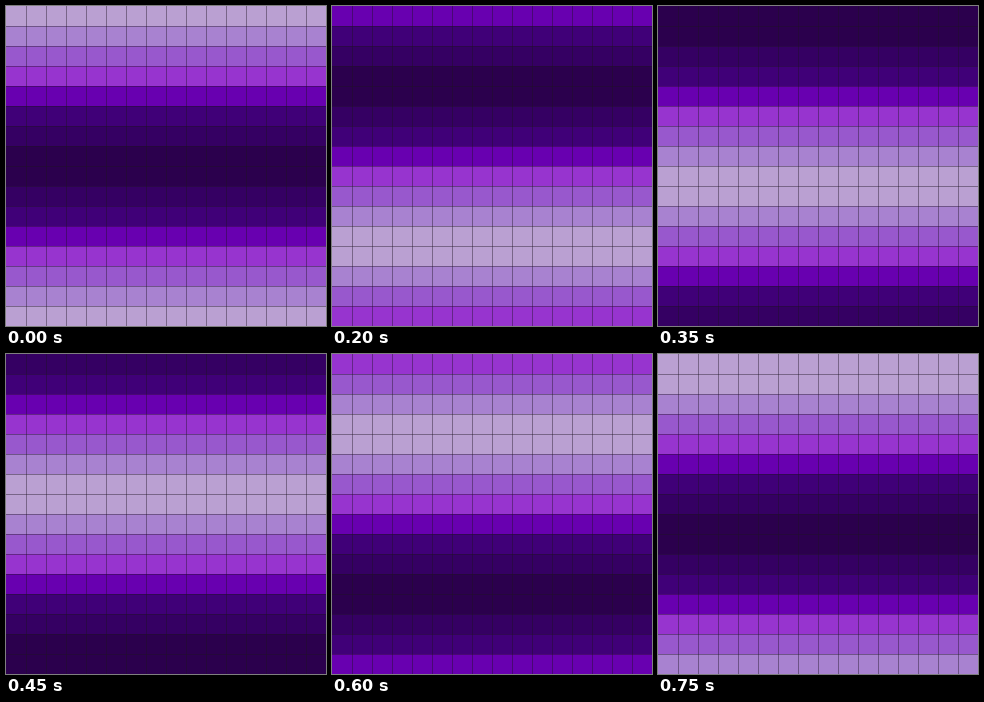
An HTML page with a canvas for the animation above (0.8 s loop, 320 by 320 pixels).

```html
<!DOCTYPE html>
<html lang="en">
<head>
<meta charset="utf-8">
<title>Purple bands</title>
<style>
  html, body { margin: 0; width: 100%; height: 100%; overflow: hidden; background: #2b004d; }
  canvas { display: block; width: 320px; height: 320px; }
</style>
</head>
<body>
<canvas id="stage" width="320" height="320"></canvas>
<script>
  const ctx = document.getElementById("stage").getContext("2d");
  const SIZE = 320, CELL = 20, STEP_MS = 50;
  const shades = ["#baa0d2", "#a882d0", "#9858cd", "#9734cf",
                  "#6800b0", "#400078", "#350063", "#2b004d"];
  const bands = [...shades, ...[...shades].reverse()];

  function draw(time) {
    const shift = Math.floor(time / STEP_MS) % bands.length;
    for (let row = 0; row < SIZE / CELL; row++) {
      ctx.fillStyle = bands[(row + shift) % bands.length];
      ctx.fillRect(0, row * CELL, SIZE, CELL);
    }
    ctx.fillStyle = "rgba(30, 20, 35, 0.42)";
    for (let p = CELL; p < SIZE; p += CELL) {
      ctx.fillRect(p, 0, 1, SIZE);
      ctx.fillRect(0, p, SIZE, 1);
    }
  }

  const start = performance.now();
  function tick() {
    draw(performance.now() - start);
    requestAnimationFrame(tick);
  }
  tick();
</script>
</body>
</html>
```
